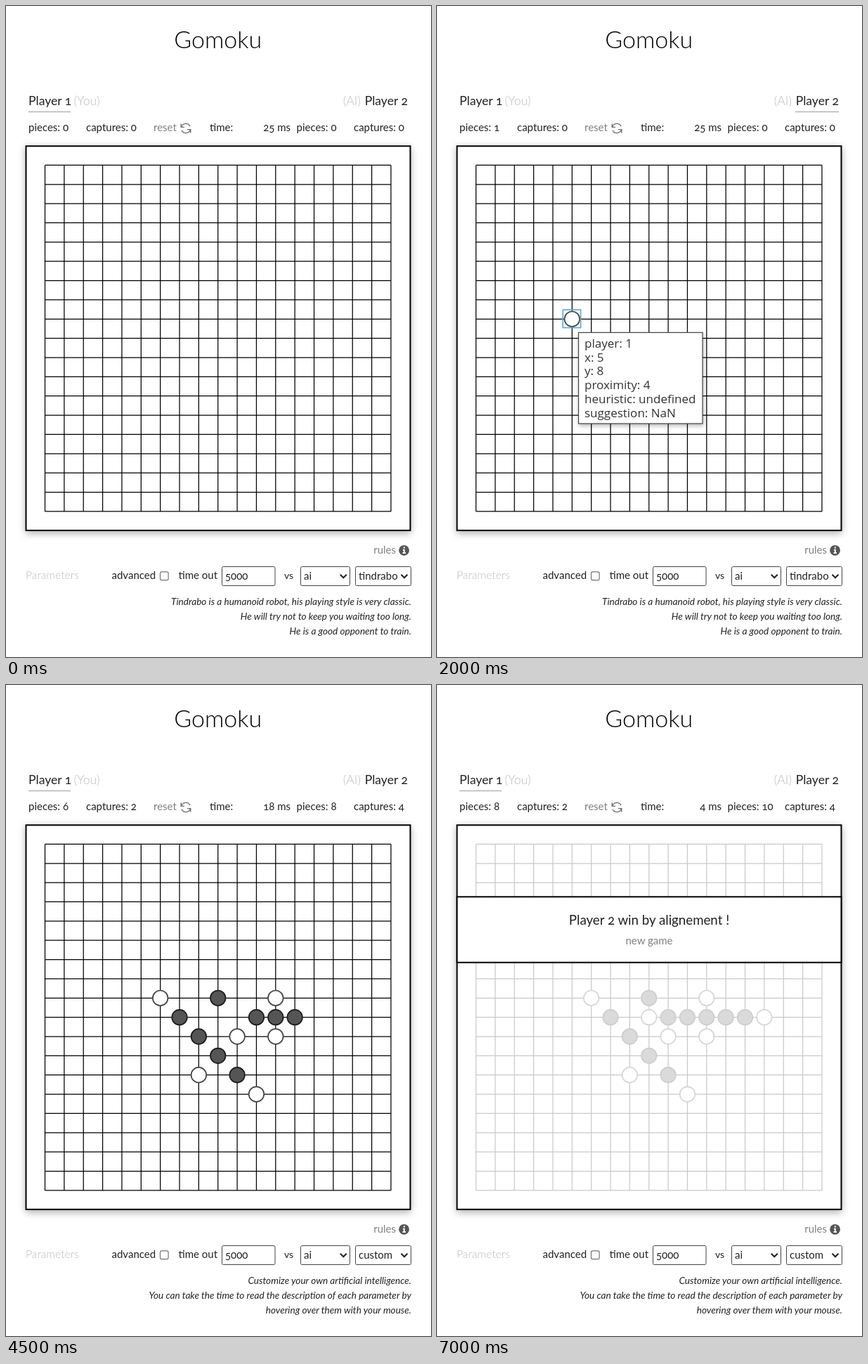
An HTML page for the animation above (8000 ms loop, 605x926 px).

```html
<!DOCTYPE html>
<html lang="en">
<head>
<meta charset="utf-8">
<title>Gomoku</title>
<style>
  html, body { margin: 0; width: 100%; height: 100%; overflow: hidden; background: #fff; }
  svg { display: block; width: 100vw; height: 100vh; }
  text { font: 15px Lato, "Open Sans", sans-serif; fill: #222; font-variant-numeric: oldstyle-nums; white-space: pre; }
  .title { font-size: 34px; font-weight: 300; fill: #000; }
  .player { font-size: 17.6px; }
  .pale { font-weight: 300; fill: #bbb; }
  .soft { fill: #808080; }
  .note { font-size: 13.6px; font-style: italic; }
  .win { font-size: 18.7px; }
  .tip text { font: 17px "Open Sans", "Noto Sans", sans-serif; fill: #333; font-variant-numeric: normal; }
  .field { fill: #fff; stroke: #444; }
  .end { text-anchor: end; }
  .mid { text-anchor: middle; }
</style>
</head>
<body>
<svg viewBox="0 0 605 926" preserveAspectRatio="none">
  <defs>
    <filter id="blur" x="-10%" y="-10%" width="120%" height="120%"><feGaussianBlur stdDeviation="5.5"/></filter>
    <filter id="tipBlur" x="-20%" y="-20%" width="140%" height="140%"><feGaussianBlur stdDeviation="3"/></filter>
    <path id="chevron" d="M-4.5 -2.2L0 2.3L4.5 -2.2" fill="none" stroke="#222" stroke-width="2"/>
  </defs>
  <rect width="605" height="926" fill="#fff"/>

  <text class="title mid" x="301.7" y="60">Gomoku</text>
  <text class="player" x="32" y="141">Player 1</text>
  <text class="player pale" x="96.5" y="141">(You)</text>
  <text class="player pale end" x="505" y="141">(AI)</text>
  <text class="player end" x="572" y="141">Player 2</text>
  <path id="turn" stroke="#b5b5b5" stroke-width="1.3"/>

  <text id="pieces1" x="32" y="178"/>
  <text id="captures1" x="114" y="178"/>
  <text class="soft" x="210" y="178">reset</text>
  <g fill="none" stroke="#707070" stroke-width="1.4">
    <path d="M249.6 172.4A6.6 6.6 0 0 1 262 171.2M262.4 175.6A6.6 6.6 0 0 1 250 176.8"/>
    <path d="M249.2 167.6V172.4H254M262.8 180.4V175.6H258"/>
  </g>
  <text x="290" y="178">time:</text>
  <text id="time" class="end" x="405" y="178"/>
  <text id="pieces2" x="413.5" y="178"/>
  <text id="captures2" x="495" y="178"/>

  <rect x="28" y="201" width="548" height="549" fill="#000" opacity=".33" filter="url(#blur)"/>
  <rect x="28.5" y="199.3" width="547" height="546.6" fill="#fff" stroke="#000" stroke-width="2"/>
  <g id="board">
    <path id="grid" fill="none" stroke="#000" stroke-width="1.25"/>
    <g id="stones" stroke-width="1.7"/>
  </g>

  <g id="hover" class="tip">
    <rect x="179.2" y="432.2" width="25.4" height="25.4" fill="none" stroke="#5aa9d6" stroke-width="1.6"/>
    <rect x="202" y="467" width="177" height="130" opacity=".3" filter="url(#tipBlur)"/>
    <rect x="201.5" y="464.5" width="176.5" height="129.5" fill="#fff" stroke="#444" stroke-width="1.2"/>
  </g>

  <g id="banner">
    <rect x="28.5" y="301.3" width="547" height="93.4" fill="#fff" stroke="#000" stroke-width="2"/>
    <text class="win mid" x="302" y="341">Player 2 win by alignement !</text>
    <text class="soft mid" x="302" y="369">new game</text>
  </g>

  <text class="soft end" x="555" y="778.5">rules</text>
  <circle cx="566.6" cy="774.3" r="7.4" fill="#555"/>
  <path d="M566.8 769.3V771.4M565 773.6H566.8V778M564.6 778H569" fill="none" stroke="#fff" stroke-width="1.9"/>

  <text class="pale" x="28" y="815" style="font-size:15.7px">Parameters</text>
  <text x="150.5" y="815">advanced</text>
  <rect x="219.5" y="804.8" width="11.6" height="11.8" rx="2.2" fill="#fff" stroke="#767676" stroke-width="1.2"/>
  <text x="245.5" y="815">time out</text>
  <rect class="field" x="307.5" y="797.5" width="75.5" height="27" rx="2"/>
  <text x="312" y="816">5000</text>
  <text x="396" y="815" style="font-size:14px">vs</text>
  <rect class="field" x="419.5" y="797.5" width="70" height="27" rx="2"/>
  <text x="424" y="816">ai</text>
  <use href="#chevron" x="480.3" y="811"/>
  <rect class="field" x="497.5" y="797.5" width="79" height="27" rx="2"/>
  <text id="rival" x="502" y="816"/>
  <use href="#chevron" x="567" y="811"/>
  <g id="notes"/>
</svg>
<script>
const NS = 'http://www.w3.org/2000/svg';
const $ = id => document.getElementById(id);
const LOOP = 8000, LEFT = 55.5, TOP = 226.4, STEP = 27.36, CELLS = 18;

const px = col => LEFT + col * STEP;
const py = row => TOP + row * STEP;

function add(parent, tag, attrs, text = '') {
  const el = document.createElementNS(NS, tag);
  for (const key in attrs) el.setAttribute(key, attrs[key]);
  el.textContent = text;
  parent.append(el);
}

// Stones are [column, row] pairs
const white = [[6, 8], [12, 8], [10, 10], [12, 10], [8, 12], [11, 13]];
const black = [[9, 8], [7, 9], [11, 9], [12, 9], [13, 9], [8, 10], [9, 11], [10, 12]];

const robot = {
  name: 'tindrabo',
  notes: ['Tindrabo is a humanoid robot, his playing style is very classic.',
    'He will try not to keep you waiting too long.',
    'He is a good opponent to train.']
};
const custom = {
  name: 'custom',
  notes: ['Customize your own artificial intelligence.',
    'You can take the time to read the description of each parameter by',
    'hovering over them with your mouse.']
};

const scenes = [
  { at: 0, turn: 1, ms: 25, captures: [0, 0], white: [], black: [], rival: robot },
  { at: 500, turn: 2, ms: 25, captures: [0, 0], white: [[5, 8]], black: [], rival: robot, hover: true },
  { at: 3000, turn: 1, ms: 18, captures: [2, 4], white, black, rival: custom },
  { at: 5500, turn: 1, ms: 4, captures: [2, 4], rival: custom, won: true,
    white: [...white, [9, 9], [15, 9]], black: [...black, [10, 9], [14, 9]] }
];

let lines = '';
for (let i = 0; i <= CELLS; i++) {
  lines += `M${px(i)} ${TOP}V${py(CELLS)}M${LEFT} ${py(i)}H${px(CELLS)}`;
}
$('grid').setAttribute('d', lines);

['player: 1', 'x: 5', 'y: 8', 'proximity: 4', 'heuristic: undefined', 'suggestion: NaN']
  .forEach((line, i) => add($('hover'), 'text', { x: 210, y: 485.7 + i * 19.85 }, line));

function drawStones(list, fill, stroke) {
  for (const [col, row] of list) {
    add($('stones'), 'circle', { cx: px(col), cy: py(row), r: 10.8, fill, stroke });
  }
}

function show(scene) {
  $('turn').setAttribute('d', scene.turn === 1 ? 'M32 150.5H92' : 'M510 150.5H572');
  [scene.white, scene.black].forEach((list, i) => {
    $('pieces' + (i + 1)).textContent = 'pieces: ' + list.length;
    $('captures' + (i + 1)).textContent = 'captures: ' + scene.captures[i];
  });
  $('time').textContent = scene.ms + ' ms';

  $('stones').replaceChildren();
  drawStones(scene.white, '#fff', '#444');
  drawStones(scene.black, '#555', '#1a1a1a');
  $('board').setAttribute('opacity', scene.won ? 0.21 : 1);
  $('hover').setAttribute('display', scene.hover ? 'inline' : 'none');
  $('banner').setAttribute('display', scene.won ? 'inline' : 'none');

  $('rival').textContent = scene.rival.name;
  $('notes').replaceChildren();
  scene.rival.notes.forEach((line, i) =>
    add($('notes'), 'text', { class: 'note end', x: 577, y: 851.5 + i * 21.1 }, line));
}

let current;
function render(time) {
  const t = time % LOOP;
  const scene = scenes.findLast(s => s.at <= t);
  if (scene !== current) show(current = scene);
}

const start = performance.now();
function tick() {
  render(performance.now() - start);
  requestAnimationFrame(tick);
}
tick();
</script>
</body>
</html>
```
